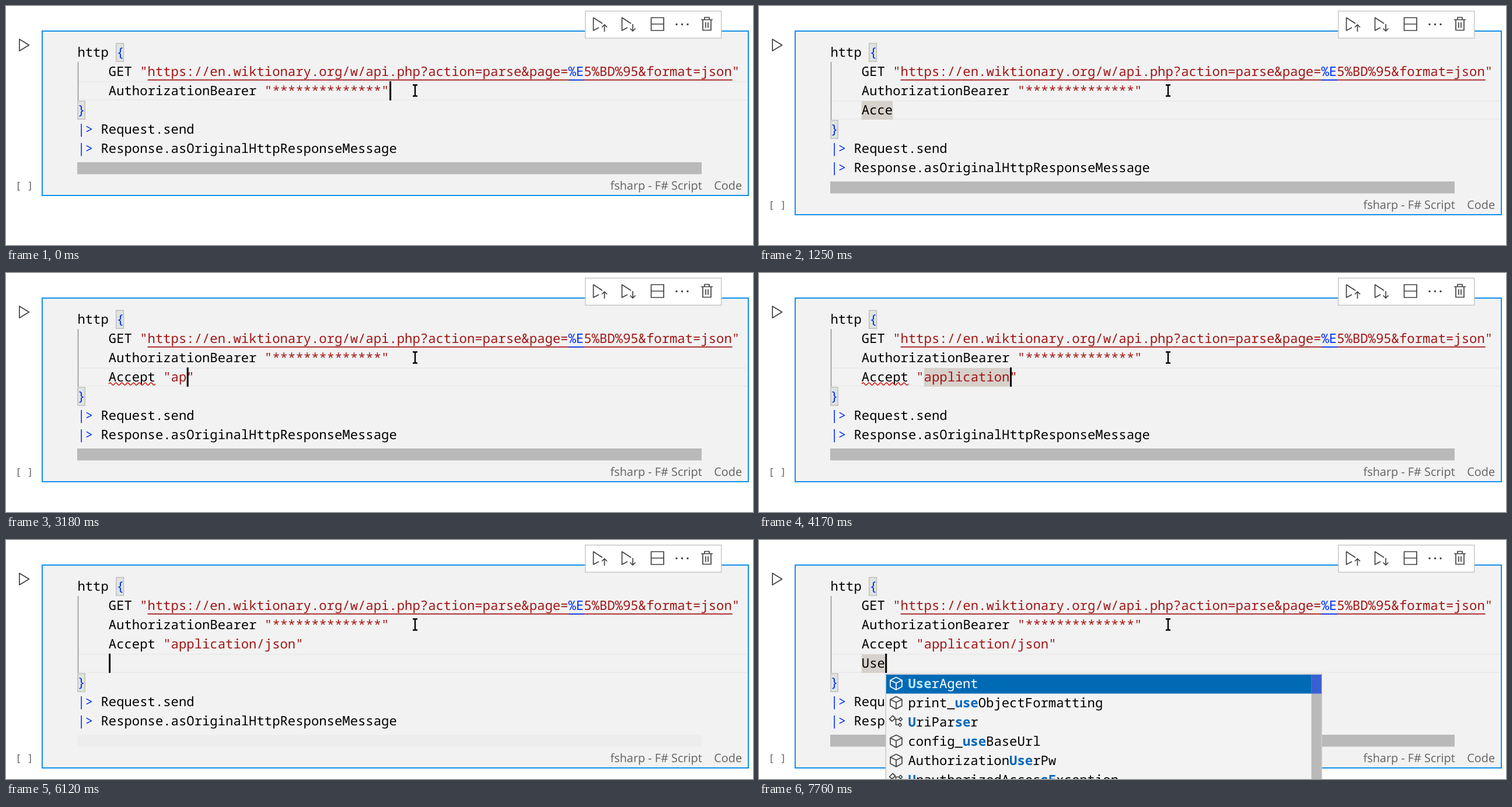
An HTML page that plays this animation: 1280 px wide and 410 px high, repeating every 7990 ms.

```html
<!DOCTYPE html>
<html lang="en">
<head>
<meta charset="utf-8">
<title>Notebook cell</title>
<style>
  html, body { margin: 0; width: 100%; height: 100%; overflow: hidden; background: #fff; }
  svg { display: block; width: 1280px; height: 410px; }
  text { font: 22.267px "Noto Sans Mono", monospace; white-space: pre; text-rendering: geometricPrecision; }
  .ui { font: 19.85px "Open Sans", "Noto Sans", sans-serif; fill: #616161; }
  .str { fill: #a31515; }
  .blue { fill: #0431fa; }
  .icon { fill: none; stroke: #424242; stroke-width: 1.7; stroke-linejoin: round; }
  .brace { fill: #dfe4df; stroke: #b9b9b9; stroke-width: 1.3; }
  .word { fill: #d7d1cb; }
  .bar { fill: #b9b9b9; }
  .match { font-weight: 700; fill: #0066bf; }
  .on text, .on .match { fill: #fff; }
  .on .match { fill: #bbe7ff; }
  .on .icon { stroke: #fff; }
</style>
</head>
<body>
<svg id="stage" viewBox="0 0 1280 410">
  <rect id="cell" x="62" y="43" width="1210" fill="#f2f2f2" stroke="#1390e9" stroke-width="2"/>
  <path class="icon" d="M23 57V77L39.5 67Z"/>

  <g id="row" fill="#ebebeb">
    <rect x="124" y="0" width="1147" height="2"/>
    <rect x="124" y="31" width="1147" height="2"/>
  </g>
  <rect id="word" class="word" height="32"/>
  <rect id="twin" class="word" x="1191" y="97" width="53.5" height="32"/>
  <rect id="guide" x="122.8" y="96" width="1.5" fill="#939393"/>

  <rect class="brace" x="188.7" y="64.2" width="12.8" height="31"/>
  <text x="122.4" y="87">http <tspan class="blue">{</tspan></text>
  <text x="175.8" y="120">GET <tspan class="str">"https://en.wiktionary.org/w/api.php?action=parse&amp;page=<tspan class="blue">%E</tspan>5%BD%95&amp;format=json"</tspan></text>
  <rect class="str" x="242.6" y="126" width="1002" height="1.7"/>
  <rect class="blue" x="964" y="126" width="26.7" height="1.7"/>
  <text x="175.8" y="153">AuthorizationBearer <tspan class="str">"**************"</tspan></text>
  <text x="175.8" y="186"><tspan id="accept"></tspan><tspan id="value" class="str"></tspan><tspan id="slash"></tspan><tspan id="rest" class="str"></tspan></text>
  <text id="use" x="175.8" y="219"></text>
  <path id="squiggle" fill="none" stroke="#d0201a" stroke-width="1.6"/>

  <g id="tail">
    <rect class="brace" x="123" y="163.2" width="12.3" height="31"/>
    <text class="blue" x="122.4" y="186">}</text>
    <text x="122.4" y="219"><tspan class="blue">|&gt;</tspan> Request.send</text>
    <text x="122.4" y="252"><tspan class="blue">|&gt;</tspan> Response.asOriginalHttpResponseMessage</text>
    <rect id="scroll" class="bar" x="122" y="268" width="1070" height="20.5"/>
    <text class="ui" x="1035.5" y="315">fsharp - F# Script</text>
    <text class="ui" x="1213.3" y="315">Code</text>
    <text x="16" y="314" style="font-size:17px;fill:#616161">[ ]</text>
  </g>

  <rect id="caret" width="3" height="33"/>
  <path d="M697 135.5H700L701 136.5L702 135.5H705M701 136V154M697 154.5H700L701 153.5L702 154.5H705" fill="none" stroke="#000" stroke-width="2.4"/>
  <g id="popups"></g>

  <rect x="992.7" y="8.7" width="233" height="46.5" fill="#fff" stroke="#c8c8c8" stroke-width="1.5"/>
  <g class="icon">
    <path d="M1016 37L1006.500 42V20L1022 30M1025.500 44V32M1021 36.500L1025.500 32L1030 36.500"/>
    <path d="M1065 37L1055.500 42V20L1071 30M1074 31V43M1069.500 38.500L1074 43L1078.500 38.500"/>
    <path d="M1105.500 20H1127V42H1105.500ZM1105.500 31H1127"/>
    <path d="M1191 23.500H1211M1197 23V19.500H1205V23M1194 24V41.500H1208V24M1199 28V37.500M1203 28V37.500"/>
  </g>
  <g fill="#424242">
    <circle cx="1149" cy="31.500" r="1.7"/><circle cx="1158.500" cy="31.500" r="1.7"/><circle cx="1168" cy="31.500" r="1.7"/>
  </g>
</svg>
<script>
const LOOP = 7990, LEFT = 122.4, CELL = 13.36, LINE = 33;
const $ = id => document.getElementById(id);
const colX = col => LEFT + col * CELL;
const rowY = row => 63 + row * LINE;
const within = (t, a, b) => t >= a && t < b;
const ramp = (t, a, b) => Math.max(0, Math.min(1, (t - a) / (b - a)));
const set = (el, attrs) => { for (const k in attrs) el.setAttribute(k, attrs[k]); };
const show = (el, on) => el.setAttribute('visibility', on ? 'visible' : 'hidden');

// part of a word that has been typed when its keys fall evenly from a to b
const typed = (word, a, b, t) => t < a ? '' :
  word.slice(0, 1 + Math.floor(ramp(t, a, b) * (word.length - 1) + 1e-6));

const ICONS = {
  cube: 'M18.500 6.500L28.500 11.500V22.500L18.500 28L8.500 22.500V11.500ZM8.500 11.500L18.500 16.500L28.500 11.500M18.500 16.500V28',
  class: 'M7 12L12.500 6.500L17 10.500L11.500 16ZM15 12.500H23M18 12.500V22H22M23 12.500L26 9.500L29 12.500L26 15.500ZM22 22L25 19L28 22L25 25Z'
};

// items: icon and label, with matched letters in [brackets]
const POPUPS = [
  { from: 1530, to: 1960, full: 1620, col: 8, row: 4, items: [
    ['cube', '[Acce]pt'], ['cube', '[Acce]ptCharset'], ['cube', '[Acce]ptDatetime'],
    ['cube', '[Acce]ptEncoding'], ['cube', '[Acce]ptLanguage'],
    ['class', '[Acce]ssViolationException'], ['class', 'Unauthorized[Acce]ssException']] },
  { from: 4310, to: 4710, col: 23, row: 4, items: [
    ['class', '[Application]Exception'], ['class', '[Application]Id']] },
  { from: 7490, to: LOOP, full: 7600, col: 7, row: 5, items: [
    ['cube', '[Use]rAgent'], ['cube', 'print_[use]ObjectFormatting'], ['class', '[U]riPar[se]r'],
    ['cube', 'config_[use]BaseUrl'], ['cube', 'Authorization[Use]rPw'],
    ['class', '[U]nauthorizedAcces[sE]xception']] }
];

const mark = s => s.replace(/\[(\w+)\]/g, '<tspan class="match">$1</tspan>');

function popupMarkup({ col, row, items, full }) {
  const height = full ? 430 : items.length * LINE + 5;
  const rows = items.map(([icon, label], i) => `
    <g class="${i ? '' : 'on'}" transform="translate(0 ${i * LINE})">
      ${i ? '' : '<rect x="1.500" y="2" width="746" height="32.500" fill="#006ab5"/>'}
      <path class="icon" d="${ICONS[icon]}"/>
      <text x="39" y="25">${mark(label)}</text>
    </g>`).join('');
  const bar = full ? `<g class="slider"><rect class="bar" x="730" y="2" width="17" height="420"/>
    <rect x="730" y="2" width="17" height="32.500" fill="#3a5fd2"/></g>` : '';
  return `<g transform="translate(${colX(col) + 0.6} ${rowY(row) + 1})">
    <rect x=".7" y=".7" width="747" height="${height}" fill="#f3f3f3" stroke="#c8c8c8" stroke-width="1.500"/>
    ${rows}${bar}</g>`;
}
$('popups').innerHTML = POPUPS.map(popupMarkup).join('');
POPUPS.forEach((p, i) => {
  p.el = $('popups').children[i];
  p.slider = p.el.querySelector('.slider');
});

let wave = '';
for (let x = 0; x <= 80; x += 1) {
  wave += `${x ? 'L' : 'M'}${176 + x} ${(190.3 - 2 * Math.sin(x * Math.PI / 5)).toFixed(2)}`;
}
$('squiggle').setAttribute('d', wave);

// [from, to, row, first column, letters]
const WORDS = [
  [1020, 1960, 3, 4, 4],
  [4170, 4710, 3, 12, 11],
  [5600, 5720, 3, 24, 4],
  [7050, LOOP, 4, 4, 3]
];
const BLINKS = [[1250, 1760], [2460, 2620], [4420, 4710], [7290, 7760]];

function draw(t) {
  const row = t < 130 ? 2 : t < 6120 ? 3 : 4, extra = (row - 2) * LINE;
  set($('cell'), { height: 282 + extra });
  set($('tail'), { transform: `translate(0 ${extra})` });
  set($('guide'), { height: 66 + extra });
  set($('row'), { transform: `translate(0 ${rowY(row)})` });
  const fade = row === 2 ? 1 : row === 3 ? ramp(t, 130, 250) : ramp(t, 6120, 6380);
  set($('scroll'), { opacity: 0.09 + 0.91 * fade });

  const name = t < 1960 ? typed('Acce', 520, 790, t) : t < 2620 ? 'Accept' : 'Accept ';
  const kind = typed('applicati', 2990, 3770, t) + typed('on', 3870, 3970, t);
  const slash = t < 4710 ? '' : '/';
  const format = typed('json', 5210, 5380, t);
  const quoted = t >= 2820;
  $('accept').textContent = name;
  $('value').textContent = quoted ? '"' + kind : '';
  $('slash').textContent = slash;
  set($('slash'), { class: t < 5010 ? '' : 'str' });
  $('rest').textContent = quoted ? format + '"' : '';
  const use = t < 6380 ? '' : typed('Use', 6380, 6780, t);
  $('use').textContent = use;
  show($('squiggle'), within(t, 2540, 4580));

  const col = row === 2 ? 40 : row === 4 ? 4 + use.length :
    4 + name.length + (quoted ? 1 + (kind + slash + format).length : 0) + (t >= 5720 ? 1 : 0);
  set($('caret'), { x: colX(col) + 0.3, y: rowY(row) });
  show($('caret'), !BLINKS.some(([a, b]) => within(t, a, b)));

  const word = WORDS.find(([a, b]) => within(t, a, b));
  show($('word'), word);
  if (word) set($('word'), { x: colX(word[3]), y: rowY(word[2]) + 1, width: word[4] * CELL });
  show($('twin'), within(t, 5600, 5720));

  for (const p of POPUPS) {
    show(p.el, within(t, p.from, p.to));
    if (p.slider) set(p.slider, { opacity: ramp(t, p.from, p.full) });
  }
}

function tick() {
  draw(performance.now() % LOOP);
  requestAnimationFrame(tick);
}
tick();
</script>
</body>
</html>
```
